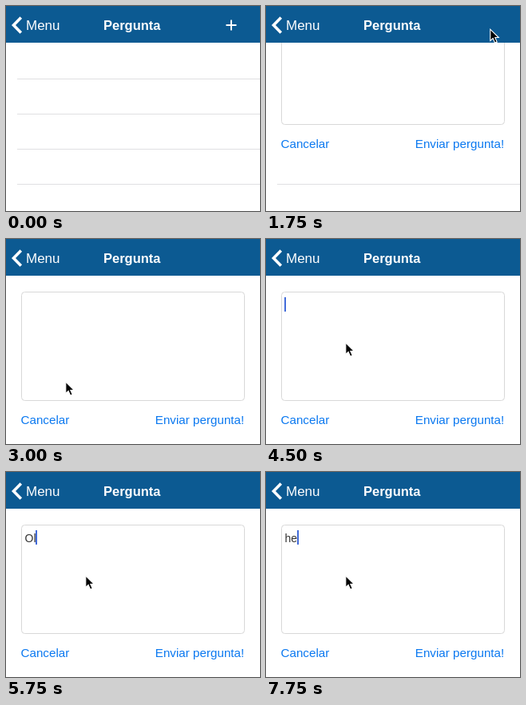
Animation, 318 px wide and 257 px high, one loop 8 s. Source, as an HTML page:

```html
<!DOCTYPE html>
<html lang="pt">
<head>
<meta charset="utf-8">
<title>Pergunta</title>
<style>
html, body { margin: 0; width: 100%; height: 100%; overflow: hidden; background: #fff; }
svg { display: block; width: 318px; height: 257px; }
text { font-family: "Liberation Sans", Arial, sans-serif; }
.link { font-size: 15.2px; fill: #0a78f0; }
.typed { font-size: 14px; fill: #333; }
.panel, .plus, .caret, .bubble, .pointer, .typed tspan { animation: 8s step-end infinite; }

/* one step of 250 ms = 3.125% */
.panel { animation-name: panel; }
@keyframes panel {
  0% { transform: translateY(-257px); }
  18.75% { transform: translateY(-178px); }
  21.875% { transform: translateY(-54px); }
  25% { transform: none; opacity: .9; }
  28.125%, 100% { transform: none; opacity: 1; }
}

.plus { animation-name: plus; }
@keyframes plus {
  0% { opacity: 1; }
  15.625% { opacity: .3; }
  18.75%, 100% { opacity: 0; }
}

.pointer { animation-name: pointer; }
@keyframes pointer {
  0% { opacity: 0; transform: translate(280px, 25px); }
  9.375% { opacity: 1; transform: translate(280px, 25px); }
  12.5% { opacity: 1; transform: translate(280px, 31px); }
  15.625% { opacity: 1; transform: translate(280px, 28px); }
  34.375% { opacity: 1; transform: translate(270px, 39px); }
  37.5% { opacity: 1; transform: translate(74px, 178px); }
  53.125% { opacity: 1; transform: translate(90px, 153px); }
  56.25%, 100% { opacity: 1; transform: translate(99px, 129px); }
}

.caret { animation-name: caret; }
@keyframes caret {
  0% { opacity: 0; transform: translateX(23px); }
  56.25% { opacity: 1; transform: translateX(23px); }
  65.625% { opacity: 0; transform: translateX(23px); }
  68.75% { opacity: 1; transform: translateX(34px); }
  71.875% { opacity: 1; transform: translateX(37px); }
  75% { opacity: 1; transform: translateX(49px); }
  81.25% { opacity: 0; transform: translateX(49px); }
  84.375% { opacity: 1; transform: translateX(41px); }
  87.5% { opacity: 1; transform: translateX(23px); }
  96.875%, 100% { opacity: 1; transform: translateX(39px); }
}

.bubble { animation-name: bubble; }
@keyframes bubble {
  0% { opacity: 0; }
  65.625% { opacity: 1; }
  68.75% { opacity: .5; }
  71.875%, 100% { opacity: 0; }
}

.typed .c1 { animation-name: c1; }
.typed .c2 { animation-name: c2; }
.typed .c3 { animation-name: c3; }
.typed .c4 { animation-name: c4; }
.typed .word { animation-name: word; }
@keyframes c1 { 0%, 87.5%, 100% { fill: transparent; } 68.75% { fill: #333; } }
@keyframes c2 { 0%, 87.5%, 100% { fill: transparent; } 71.875% { fill: #333; } }
@keyframes c3 { 0%, 87.5%, 100% { fill: transparent; } 75% { fill: #333; } }
@keyframes c4 { 0%, 84.375%, 100% { fill: transparent; } 75% { fill: #333; } }
@keyframes word { 0% { fill: transparent; } 96.875%, 100% { fill: #333; } }
</style>
</head>
<body>
<svg viewBox="0 0 318 257" xmlns="http://www.w3.org/2000/svg">
  <rect width="318" height="257" fill="#fff"/>
  <path d="M14 91.5H318M14 135.5H318M14 179.5H318M14 223.5H318" stroke="#e0e0e2"/>

  <g class="panel">
    <rect width="318" height="257" fill="#fff"/>
    <rect x="19.5" y="66.5" width="279" height="136" rx="4" fill="#fff" stroke="#d8d8d8"/>
    <text class="link" x="18.5" y="232">Cancelar</text>
    <text class="link" x="186.8" y="232">Enviar pergunta!</text>
  </g>

  <text class="typed" x="23.5" y="88"><tspan class="c1">O</tspan><tspan class="c2">l</tspan><tspan class="c3">´</tspan><tspan class="c4">a</tspan></text>
  <text class="typed" x="23.5" y="88"><tspan class="word">he</tspan></text>
  <rect class="caret" y="73" width="2" height="18" fill="#426bd9"/>

  <rect width="318" height="46" fill="#0c5a92"/>
  <path d="M18.8 14.5L9.5 24L18.8 33.5" fill="none" stroke="#fff" stroke-width="3.6"/>
  <text x="25" y="30" font-size="17" fill="#fff">Menu</text>
  <text x="122" y="30" font-size="16.5" font-weight="700" fill="#fff">Pergunta</text>
  <path class="plus" d="M275.5 24H288.5M282 17.5V30.5" stroke="#fff" stroke-width="2"/>

  <g class="bubble">
    <path d="M17 19H70a8 8 0 0 1 8 8V47a8 8 0 0 1-8 8H36L27 64L18 55H17a8 8 0 0 1-8-8V27a8 8 0 0 1 8-8Z" fill="#000" fill-opacity=".88"/>
    <text x="26" y="42" font-size="14" fill="#fff">Colar</text>
  </g>

  <g class="pointer">
    <path d="M.8 1.2V15.6L4.1 12.5L6.6 18.2L9.2 17.1L6.8 11.5H11.3Z" fill="#000" stroke="#fff" stroke-width="1.1"/>
  </g>
</svg>
</body>
</html>
```
